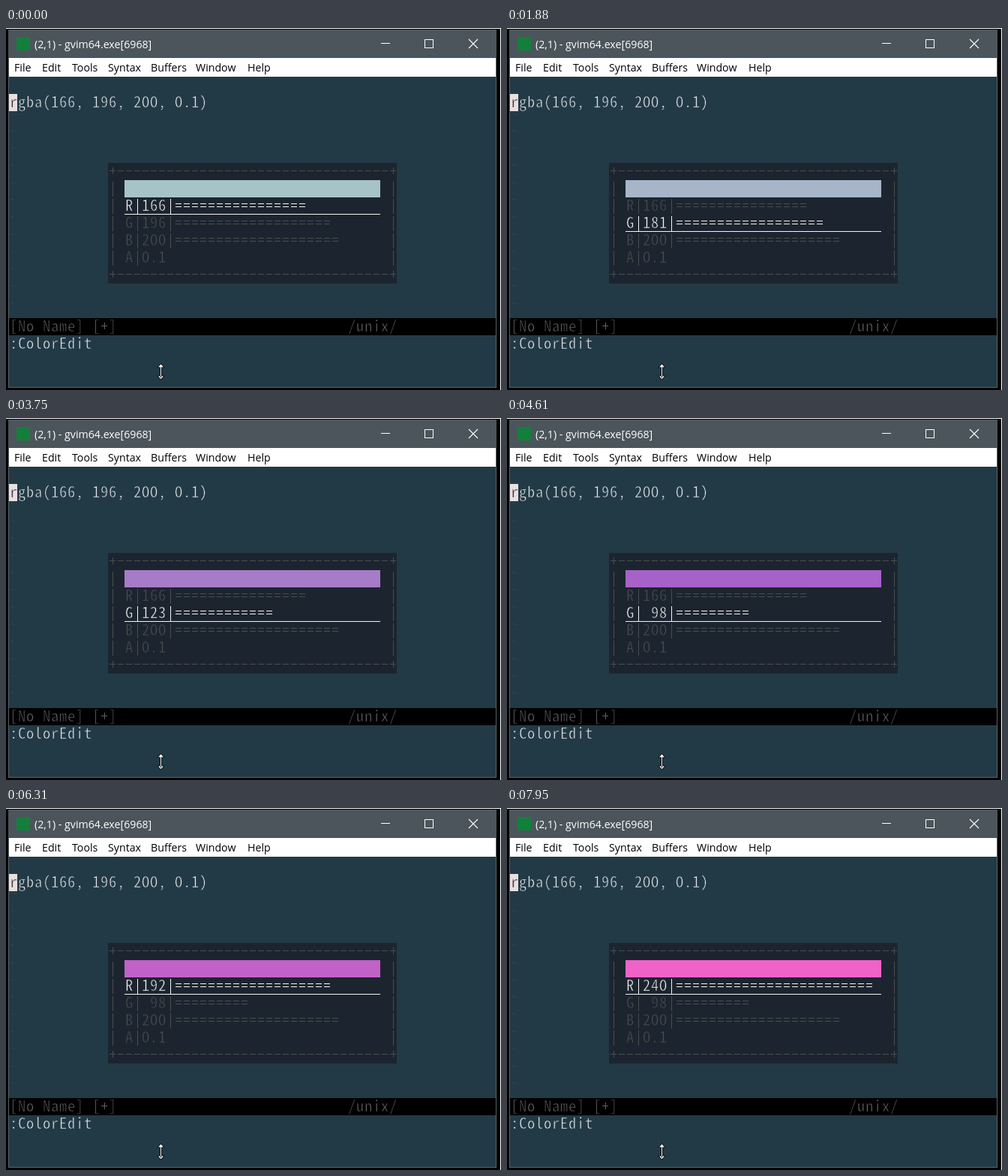
An HTML page with a canvas for the animation above (8 s loop, 660 by 483 pixels).

```html
<!DOCTYPE html>
<html lang="en">
<head>
<meta charset="utf-8">
<title>Color editor popup</title>
<style>
html, body { margin: 0; width: 100%; height: 100%; overflow: hidden; background: #000; }
canvas { display: block; }
</style>
</head>
<body>
<canvas id="stage" width="660" height="483"></canvas>
<script>
const ctx = document.getElementById('stage').getContext('2d');
const LOOP = 8000;
const CW = 11, RH = 23, X0 = 4, Y0 = 65;
const MONO = '300 20.5px "Noto Sans Mono CJK JP", "Noto Sans Mono", monospace';
const UI = '14.2px "Open Sans", "Noto Sans", sans-serif';
const BG = '#223a46', FG = '#e4e6e6', LIT = '#f4f4f4', DIM = '#4b4d50';
const POPUP = '#1c252f', STATUS = '#606266', CURSOR = '#e9dfe1';

function rect(x, y, w, h, color) {
  ctx.fillStyle = color;
  ctx.fillRect(x, y, w, h);
}

function label(text, x, y, color) {
  ctx.font = UI;
  ctx.textAlign = 'left';
  ctx.fillStyle = color;
  ctx.fillText(text, x, y);
}

function line(x1, y1, x2, y2, color, width) {
  ctx.beginPath();
  ctx.moveTo(x1, y1);
  ctx.lineTo(x2, y2);
  ctx.strokeStyle = color;
  ctx.lineWidth = width;
  ctx.stroke();
}

// Symbols that sit on whole pixels of a cell
const dash = (x, y) => ctx.fillRect(x + 2, y, 8, 1);
const bar = (x, y, h) => ctx.fillRect(x + 6, y, 1, h);
const SYMBOLS = {
  '-': (x, y) => dash(x, y + 10),
  '|': (x, y) => bar(x, y + 2, 20),
  '+': (x, y) => { dash(x, y + 10); bar(x, y + 6, 9); },
  '=': (x, y) => { dash(x, y + 8); dash(x, y + 12); }
};

// Terminal text on the character grid; an outline in the paper colour thins the strokes
function cells(text, col, row, color, paper) {
  ctx.font = MONO;
  ctx.textAlign = 'center';
  ctx.fillStyle = color;
  ctx.strokeStyle = paper;
  ctx.lineWidth = 0.6;
  [...text].forEach((ch, i) => {
    const x = X0 + (col + i) * CW, y = Y0 + row * RH;
    if (SYMBOLS[ch]) return SYMBOLS[ch](x, y);
    // the capital O is the plain, undotted zero of this face
    const glyph = ch === '0' ? 'O' : ch;
    const base = y + (ch === '~' ? 11 : 18);
    ctx.fillText(glyph, x + 6, base);
    ctx.strokeText(glyph, x + 6, base);
  });
}

// A held key: one step when pressed, then auto-repeat seen once per tick.
// marks are [tick, value] pairs joined by straight lines.
const GREEN = { from: 196, step: -1, press: 1010, repeat: 1450, tick: 143, marks: [[0, 194], [3, 181], [10, 147], [22, 98]] };
const RED = { from: 166, step: 1, press: 5060, repeat: 5650, tick: 130, marks: [[0, 171], [10, 212], [17, 240]] };

function heldValue({ from, step, press, repeat, tick, marks }, t) {
  if (t < press) return from;
  if (t < repeat) return from + step;
  const k = Math.floor((t - repeat) / tick);
  const i = marks.findIndex(m => m[0] > k);
  if (i < 0) return marks[marks.length - 1][1];
  const [k0, v0] = marks[i - 1], [k1, v1] = marks[i];
  return Math.round(v0 + (v1 - v0) * (k - k0) / (k1 - k0));
}

function windowFrame() {
  rect(0, 0, 660, 483, '#000');
  rect(0, 0, 660, 1, '#fff');
  rect(659, 0, 1, 483, '#fff');
  rect(3, 2, 651, 478, '#59646a');
}

function titleBar() {
  rect(3, 2, 651, 38, '#4b555b');
  rect(14, 12, 18, 18, '#12803a');
  label('(2,1) - gvim64.exe[6968]', 38, 27, '#fff');
  rect(500, 20, 12, 1, '#fff');
  ctx.strokeStyle = '#fff';
  ctx.lineWidth = 1;
  ctx.strokeRect(558.5, 15.5, 11, 11);
  line(617, 15, 629, 27, '#fff', 1.1);
  line(629, 15, 617, 27, '#fff', 1.1);
}

function menuBar() {
  rect(4, 40, 649, 25, '#fff');
  const items = { File: 11, Edit: 48, Tools: 88, Syntax: 136, Buffers: 193, Window: 253, Help: 322 };
  for (const name in items) label(name, items[name], 58, '#000');
}

// Vertical resize arrow: a stem and two mirrored heads
function pointer() {
  ctx.save();
  ctx.translate(206.5, 458.5);
  ctx.beginPath();
  ctx.rect(-0.5, -8, 1, 16);
  for (const s of [-1, 1]) {
    ctx.moveTo(0, 10 * s);
    ctx.lineTo(3.5, 6 * s);
    ctx.lineTo(-3.5, 6 * s);
    ctx.closePath();
  }
  ctx.strokeStyle = '#000';
  ctx.lineWidth = 1.4;
  ctx.stroke();
  ctx.fillStyle = '#fff';
  ctx.fill();
  ctx.restore();
}

function editor(cursorOn) {
  rect(4, 65, 649, 414, BG);
  cells('rgba(166, 196, 200, 0.1)', 0, 1, FG, BG);
  if (cursorOn) {
    rect(X0, Y0 + RH, CW, RH, CURSOR);
    cells('r', 0, 1, '#15191c', CURSOR);
  }
  for (let row = 2; row < 14; row++) cells('~', 0, row, '#34464f', BG);
  rect(4, 387, 649, RH, '#000');
  cells('[No Name] [+]', 0, 14, STATUS, '#000');
  cells('/unix/', 41, 14, STATUS, '#000');
  cells(':ColorEdit', 0, 15, FG, BG);
}

function popup(values, selected, cornerOn) {
  rect(136, 180, 385, 161, POPUP);
  const edge = '+' + '-'.repeat(33);
  cells(edge + '+', 12, 5, DIM, POPUP);
  cells(cornerOn ? edge + '+' : edge, 12, 11, DIM, POPUP);
  for (let row = 6; row < 11; row++) {
    cells('|', 12, row, DIM, POPUP);
    cells('|', 46, row, DIM, POPUP);
  }
  rect(158, 203, 341, RH, `rgb(${values})`);
  values.forEach((v, i) => {
    const color = i === selected ? LIT : DIM;
    const meter = '='.repeat(Math.floor(v / 10));
    cells(`${'RGB'[i]}|${String(v).padStart(3)}|${meter}`, 14, 7 + i, color, POPUP);
    if (i === selected) rect(158, 248 + i * RH, 341, 1, LIT);
  });
  cells('A|0.1', 14, 10, DIM, POPUP);
}

function draw(t) {
  const within = (a, b) => t >= a && t < b;
  const redraw = within(2930, 3050);
  const cursorOn = !redraw && !within(7820, 7950);
  const selected = within(430, 4930) ? 1 : 0;
  windowFrame();
  titleBar();
  menuBar();
  editor(cursorOn);
  popup([heldValue(RED, t), heldValue(GREEN, t), 200], selected, !redraw);
  pointer();
}

const start = performance.now();
function frame() {
  draw((performance.now() - start) % LOOP);
  requestAnimationFrame(frame);
}
frame();
</script>
</body>
</html>
```
